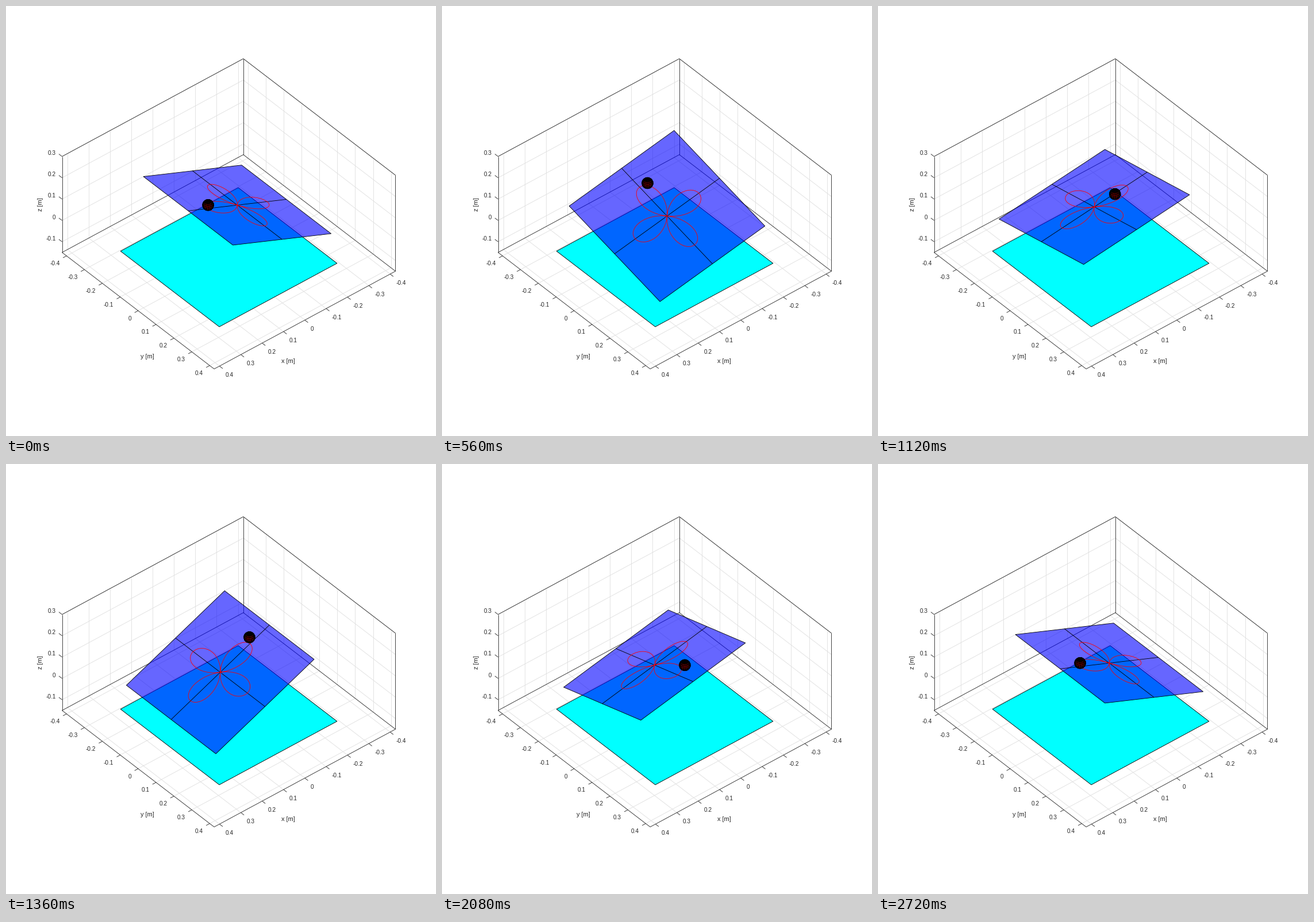
Write a matplotlib script that moves like this. It is 748 by 748 pixels and loops after 2.76 s.

```python
import numpy as np
import matplotlib.pyplot as plt
from matplotlib.animation import FuncAnimation
from matplotlib.patches import Circle, Polygon

SIZE, DPI = 748, 100
FRAMES, STEP_MS, PERIOD = 69, 40, 68
PX = 72 / DPI                       # one pixel in points

# Orthographic view
AZ, EL, SCALE = np.radians(140), np.radians(40), 484.3
ORIGIN = np.array([387.0, 388.85])
VIEW = SCALE * np.array([
    [np.cos(AZ), np.sin(AZ), 0],
    [np.sin(EL) * np.sin(AZ), -np.sin(EL) * np.cos(AZ), -np.cos(EL)],
])
TO_EYE = np.array([np.sin(AZ) * np.cos(EL), -np.cos(AZ) * np.cos(EL), np.sin(EL)])

LIM, Z_LOW, Z_HIGH = 0.425, -0.15, 0.3
HALF, PIVOT, RADIUS = 0.25, 0.1025, 0.02
AXIS_INK = (0.15, 0.15, 0.15)

# Odd harmonics 1, 3, 5 as (cos, sin) pairs
TILT_X = [(-0.127, -0.0193), (-0.3108, 0.0352), (0.0378, -0.06)]
TILT_Y = [(0.0067, 0.1006), (-0.0291, -0.2824), (0.0224, -0.0096)]
BALL_X = [(0.36, 0.02), (0.315, -0.045), (-0.02, 0.03)]
BALL_Y = [(0.005, -0.345), (0.025, 0.305)]


def project(points):
    return ORIGIN + np.asarray(points, float) @ VIEW.T


def wave(terms, phase):
    return sum(a * np.cos(k * phase) + b * np.sin(k * phase)
               for k, (a, b) in zip((1, 3, 5), terms))


fig = plt.figure(figsize=(SIZE / DPI, SIZE / DPI), dpi=DPI, facecolor="white")
ax = fig.add_axes([0, 0, 1, 1])
ax.set_xlim(-0.5, SIZE - 0.5)
ax.set_ylim(SIZE - 0.5, -0.5)
ax.axis("off")


def stroke(xy, color="black", z=1, width=0.85):
    xy = np.asarray(xy)
    return ax.plot(xy[:, 0], xy[:, 1], color=color, lw=width * PX, zorder=z,
                   solid_capstyle="butt")[0]


def line3(*points, **style):
    """Separate segments, so that upright ones snap to whole pixels."""
    xy = project(points)
    for pair in zip(xy, xy[1:]):
        stroke(pair, **style)


def label(x, y, text, ha="center", size=10, **kw):
    ax.text(x, y, text, ha=ha, va=kw.pop("va", "baseline"), color=AXIS_INK,
            family="Liberation Sans", fontsize=size * PX, **kw)


def tick(point, direction, shift, text, ha):
    start = project(point)
    way = VIEW @ np.array(direction, float)
    stroke([start, start + 7 * way / np.hypot(*way)], AXIS_INK, z=2)
    label(start[0] + shift[0], start[1] + shift[1] + 3.5, text, ha)


def draw_axes():
    grid = dict(color=(0.875,) * 3, z=0)
    for i in range(-4, 5):
        v = i / 10
        text = f"{v:g}"
        line3((v, LIM, Z_LOW), (v, -LIM, Z_LOW), (v, -LIM, Z_HIGH), **grid)
        line3((LIM, v, Z_LOW), (-LIM, v, Z_LOW), (-LIM, v, Z_HIGH), **grid)
        tick((LIM, v, Z_LOW), (1, 0, 0), (-11.8, 13), text, "right")
        tick((v, LIM, Z_LOW), (0, 1, 0), (10, 15), text, "left")
    for i in range(-1, 4):
        v = i / 10
        line3((LIM, -LIM, v), (-LIM, -LIM, v), (-LIM, LIM, v), **grid)
        tick((LIM, -LIM, v), (0, -1, 0), (-11, -6), f"{v:g}", "right")

    corners = [(LIM, -LIM), (-LIM, -LIM), (-LIM, LIM), (LIM, LIM)]
    line3(*[(x, y, Z_LOW) for x, y in corners + corners[:1]], color=AXIS_INK)
    line3(*[(x, y, Z_HIGH) for x, y in corners[:3]], color=AXIS_INK)
    for x, y in corners[:3]:
        line3((x, y, Z_LOW), (x, y, Z_HIGH), color=AXIS_INK)

    label(490.5, 621, "x [m]", size=11)
    label(245, 613, "y [m]", size=11)
    label(59.5, 345, "z [m]", size=11, rotation=90, va="center")


def square(half):
    return np.array([(1, -1), (-1, -1), (-1, 1), (1, 1), (1, -1)]) * half


def draw_base():
    pts = project([(x, y, -0.1284) for x, y in square(0.276)])
    ax.add_patch(Polygon(pts, fc="cyan", ec="none", zorder=3))
    stroke(pts, z=4)


def ball_mesh():
    """Visible half of the sphere's wire mesh, as pixel offsets."""
    fine = np.linspace(0, 2 * np.pi, 61)
    curves = []
    for lat in np.radians(np.arange(-72, 90, 18)):
        curves.append((np.cos(lat) * np.cos(fine), np.cos(lat) * np.sin(fine),
                       np.full_like(fine, np.sin(lat))))
    for lon in np.radians(np.arange(0, 180, 18)):
        curves.append((np.cos(fine) * np.cos(lon), np.cos(fine) * np.sin(lon),
                       np.sin(fine)))
    parts = []
    for curve in curves:
        pts = np.column_stack(curve)
        flat = RADIUS * pts @ VIEW.T
        flat[pts @ TO_EYE < 0] = np.nan
        parts += [flat, [[np.nan, np.nan]]]
    return np.vstack(parts)


draw_axes()
draw_base()

OUTLINE = square(1)
t = np.linspace(0, 2 * np.pi, 241)
ROSE = 0.605 * np.cos(2 * t)[:, None] * np.column_stack((np.cos(t), np.sin(t)))
MESH = ball_mesh()

plate = ax.add_patch(Polygon(OUTLINE, fc=(0, 0, 1, 0.6), ec="none", zorder=5))
marks = [
    (OUTLINE, stroke(OUTLINE, z=6)),
    (np.array([(-1, 0), (1, 0)]), stroke(OUTLINE, z=6)),
    (np.array([(0, -1), (0, 1)]), stroke(OUTLINE, z=6)),
    (ROSE, stroke(ROSE, "red", z=7)),
]
ball = ax.add_patch(Circle((0, 0), SCALE * RADIUS, fc=(0.85, 0, 0), ec="black",
                           lw=PX, zorder=8))
mesh = stroke(MESH, z=9, width=1.25)


def update(i):
    phase = 2 * np.pi * i / PERIOD
    beta, alpha = wave(TILT_X, phase), -wave(TILT_Y, phase)
    sb, cb, sa, ca = np.sin(beta), np.cos(beta), np.sin(alpha), np.cos(alpha)
    sides = HALF * np.array([(cb, 0, -sb), (sb * sa, ca, cb * sa)])
    normal = np.array([sb * ca, -sa, cb * ca])

    def on_plate(uv, lift=0.0):
        return project(np.asarray(uv) @ sides + (PIVOT + lift) * normal)

    plate.set_xy(on_plate(OUTLINE))
    for shape, artist in marks:
        artist.set_data(*on_plate(shape).T)

    spot = on_plate((wave(BALL_X, phase), wave(BALL_Y, phase)), RADIUS)
    ball.center = tuple(spot)
    mesh.set_data(*(MESH + spot).T)
    return [plate, ball, mesh] + [artist for _, artist in marks]


anim = FuncAnimation(fig, update, frames=FRAMES, interval=STEP_MS,
                     repeat=True, repeat_delay=0, blit=False)
plt.show()
```
